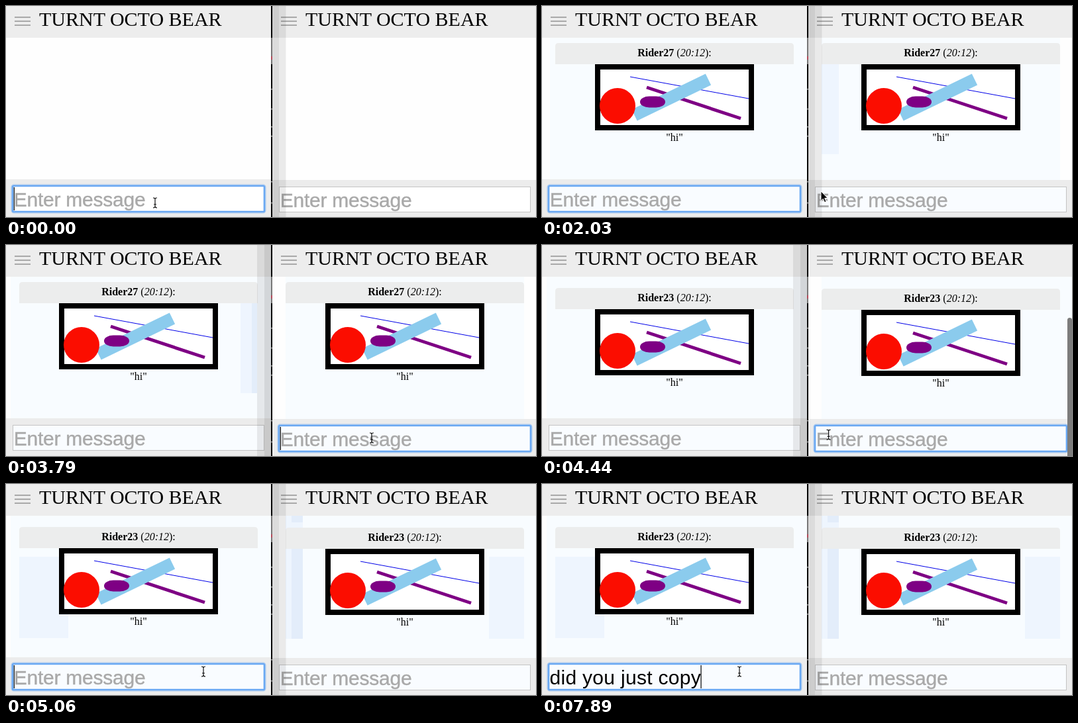
An HTML page that plays this animation: 800x319 px, repeating every 8000 ms.

```html
<!DOCTYPE html>
<html lang="en">
<head>
<meta charset="utf-8">
<title>Two chat windows</title>
<style>
html, body { margin: 0; width: 100%; height: 100%; overflow: hidden; background: #fefefe; }
svg { display: block; width: 800px; height: 319px; }
text { white-space: pre; font-kerning: none; }
.serif { font: 16px "Liberation Serif", serif; }
.title { font: 30px "Liberation Serif", serif; }
.field { font: 30px "Liberation Sans", sans-serif; }
.hint { fill: #a9a9a9; stroke: #a9a9a9; stroke-width: .4; letter-spacing: -.25px; }
.typed { letter-spacing: .3px; }
.mid { text-anchor: middle; }
</style>
</head>
<body>
<svg id="stage" viewBox="0 0 800 319"></svg>
<script>
const LOOP = 8000;
const stage = document.getElementById('stage');

const rect = (x, y, w, h, fill, extra = '') =>
  `<rect x="${x}" y="${y}" width="${w}" height="${h}" fill="${fill}" ${extra}/>`;

const drawing = `
  ${rect(84, 92, 232, 92, '#fff', 'stroke="#000" stroke-width="8"')}
  <path d="M133 107L312 140" stroke="#0000e8"/>
  <path d="M158 123L300 170" stroke="#7e0084" stroke-width="5"/>
  <path d="M139.5 165L251 111" stroke="#8bcbed" stroke-width="19"/>
  <circle cx="114" cy="151" r="27" fill="#fb0d00"/>
  ${rect(148, 136.5, 38, 17, '#7e0084', 'rx="14" ry="8.5"')}
  <text class="serif mid" x="200" y="204">"hi"</text>`;

function pane(id, x, dy) {
  return `<g id="${id}" transform="translate(${x})">
    ${rect(0, 0, 400, 319, '#fefefe')}
    <g class="tint"></g>
    <g class="msg">
      <path d="M20 88V61q0-5 5-5H375q5 0 5 5V88z" fill="#eceded"/>
      <text class="serif mid" x="200" y="76"><tspan class="who" font-weight="bold"></tspan> (<tspan font-style="italic">20:12</tspan>):</text>
      ${drawing}
    </g>
    ${rect(0, 0, 400, 48, '#ededed')}
    <path d="M13 17H37M13 23H37M13 29H37" stroke="#929292" stroke-width="1.6"/>
    <text class="title" x="50" y="30">TURNT OCTO BEAR</text>
    ${rect(0, 262 + dy, 400, 57, '#ececec')}
    <g transform="translate(0 ${dy})">
      <rect class="box" x="10.5" y="272.5" width="379" height="38" stroke="#c4c4c4"/>
      <g class="ring" fill="none" stroke="#69a8f3">
        <rect x="9.5" y="271.5" width="381" height="40" rx="2.5" stroke-width="4" opacity=".5"/>
        <rect x="10" y="272" width="380" height="39" rx="1.5" stroke-width="2.2"/>
      </g>
      <text class="field hint" x="11.8" y="303">Enter message</text>
      <text class="field typed" x="11.5" y="303"></text>
      <path class="caret" d="M0 274V309" stroke="#000" stroke-width="1.2"/>
    </g>
  </g>`;
}

const specks = [125, 155, 182, 196, 265, 297]
  .map(y => rect(400, y, 2, 1.5, '#999')).join('');

stage.innerHTML = pane('left', 0, 0) + pane('right', 402, 1) + `
  <g id="shadeL">${rect(379, 0, 21, 319, '#000', 'opacity=".08"')}${rect(390, 0, 10, 319, '#000', 'opacity=".08"')}</g>
  <g id="shadeR">${rect(402, 0, 20.5, 319, '#000', 'opacity=".08"')}${rect(402, 0, 10, 319, '#000', 'opacity=".06"')}</g>
  ${rect(400, 0, 2, 319, '#000')}
  ${rect(400, 48, 2, 40, '#777')}${rect(400, 76, 2, 5, '#b34a5a')}${specks}
  ${rect(793, 110, 7, 212, '#7c7c7c', 'id="bar" rx="3.5"')}
  <path id="beam" d="M-3-7q3 0 3 2q0-2 3-2M0-5V6M-3 8q3 0 3-2q0 2 3 2M-2 3H2" fill="none" stroke="#111" stroke-width="1.2"/>
  <path id="arrow" d="M0 0V14.5L3.3 11.5L5.6 16.8L8 15.8L5.7 10.6H10.2Z" fill="#000" stroke="#fff"/>`;

const $ = id => document.getElementById(id);
const show = (el, on) => el.setAttribute('visibility', on ? 'visible' : 'hidden');
const within = (t, a, b) => t >= a && t < b;
const clamp = v => Math.max(0, Math.min(1, v));
const ease = v => v * v * (3 - 2 * v);

// Typing: [time, text]
const leftKeys = [
  [0, ''], [900, 'h'], [960, 'hi'], [1490, ''],
  [5530, 'd'], [5650, 'di'], [5710, 'did'], [5820, 'did '],
  [6000, 'did y'], [6060, 'did you'], [6170, 'did you '], [6350, 'did you j'],
  [6530, 'did you ju'], [6650, 'did you jus'], [6770, 'did you just '],
  [7540, 'did you just c'], [7600, 'did you just co'], [7710, 'did you just cop'],
  [7890, 'did you just copy']
];
const rightKeys = [[0, ''], [3320, 'h'], [3440, 'hi'], [3790, '']];
const typedAt = (keys, t) => keys.filter(k => k[0] <= t).pop()[1];

// Message tints: [from, to, x, y, w, h, colour]
const MSG = '#f8fcff', PALE = '#eef5fe', DEEP = '#e3edfa';
const leftTints = [
  [1490, 2400, 12, 48, 388, 214, MSG],
  [2400, LOOP, 7, 48, 393, 214, MSG],
  [2400, 3850, 354, 88, 17, 136, PALE],
  [2400, 3850, 371, 88, 8, 136, DEEP],
  [5060, LOOP, 20, 110, 74, 123, PALE]
];
const rightTints = [
  [1490, 3850, 20, 48, 360, 215, MSG],
  [1490, 3790, 20, 88, 26, 136, PALE],
  [3850, LOOP, 20, 48, 378, 215, MSG],
  [4600, LOOP, 20, 48, 26, 186, PALE],
  [4600, LOOP, 29, 48, 17, 10, DEEP],
  [4600, LOOP, 29, 97, 17, 137, DEEP],
  [5060, LOOP, 327, 110, 53, 124, PALE]
];

function drawPane(id, t, s) {
  const q = c => $(id).querySelector('.' + c);
  q('tint').innerHTML = s.tints.filter(r => within(t, r[0], r[1]))
    .map(r => rect(...r.slice(2))).join('');
  show(q('msg'), t >= 1490);
  q('msg').setAttribute('transform', `translate(0 ${t < 3850 ? 0 : s.shift})`);
  q('who').textContent = t < 3850 ? 'Rider27' : 'Rider23';
  q('box').setAttribute('fill', t < 1490 ? '#fff' : '#f9fcff');
  q('ring').setAttribute('opacity', s.ring);
  const text = typedAt(s.keys, t), typed = q('typed');
  typed.textContent = text;
  show(q('hint'), !text);
  show(q('caret'), s.caret);
  const width = text ? typed.getComputedTextLength() : 0.8;
  q('caret').setAttribute('transform', `translate(${11.5 + width})`);
}

function pointer(t) {
  if (t < 2030) return [225, 297, true];
  if (t < 2790) {
    const u = ease(clamp((t - 2030) / 370)), back = ease(clamp((t - 2400) / 150));
    return [421 + 141 * u - 10 * back, 280 + 11 * u, t >= 2490];
  }
  if (t < 4200) return [552, 291, true];
  if (t < 5010) {
    const u = ease(clamp((t - 4200) / 500)), x = 552 - 254 * u;
    return [x, 291 - 10 * u, x > 412];
  }
  return [298, 283, true];
}

function render(t) {
  const leftFront = t < 2490 || t >= 4720;
  const fade = (t, start) => clamp(Math.floor((t - start) / 58 + 1) / 3);
  drawPane('left', t, {
    tints: leftTints, shift: 9, keys: leftKeys,
    ring: t < 2490 ? 1 : t >= 4890 ? fade(t, 4890) : 0,
    caret: within(t, 0, 480) || within(t, 900, 2030) || within(t, 4720, 7240) || t >= 7540
  });
  drawPane('right', t, {
    tints: rightTints, shift: 10, keys: rightKeys,
    ring: within(t, 2900, 4720) ? fade(t, 2900) : 0,
    caret: within(t, 2790, 4200)
  });
  show($('shadeL'), !leftFront);
  show($('shadeR'), leftFront);
  show($('bar'), within(t, 3850, 5010));

  // The pointer advances in short ticks
  const tick = within(t, 2030, 2550) ? 2030 + Math.floor((t - 2030) / 58) * 58
    : within(t, 4200, 4950) ? 4200 + Math.floor((t - 4200) / 60) * 60 : t;
  const [x, y, beam] = pointer(tick);
  for (const id of ['beam', 'arrow']) $(id).setAttribute('transform', `translate(${x} ${y})`);
  show($('beam'), beam);
  show($('arrow'), !beam);
}

const start = performance.now();
function loop() {
  render((performance.now() - start) % LOOP);
  requestAnimationFrame(loop);
}
loop();
</script>
</body>
</html>
```
